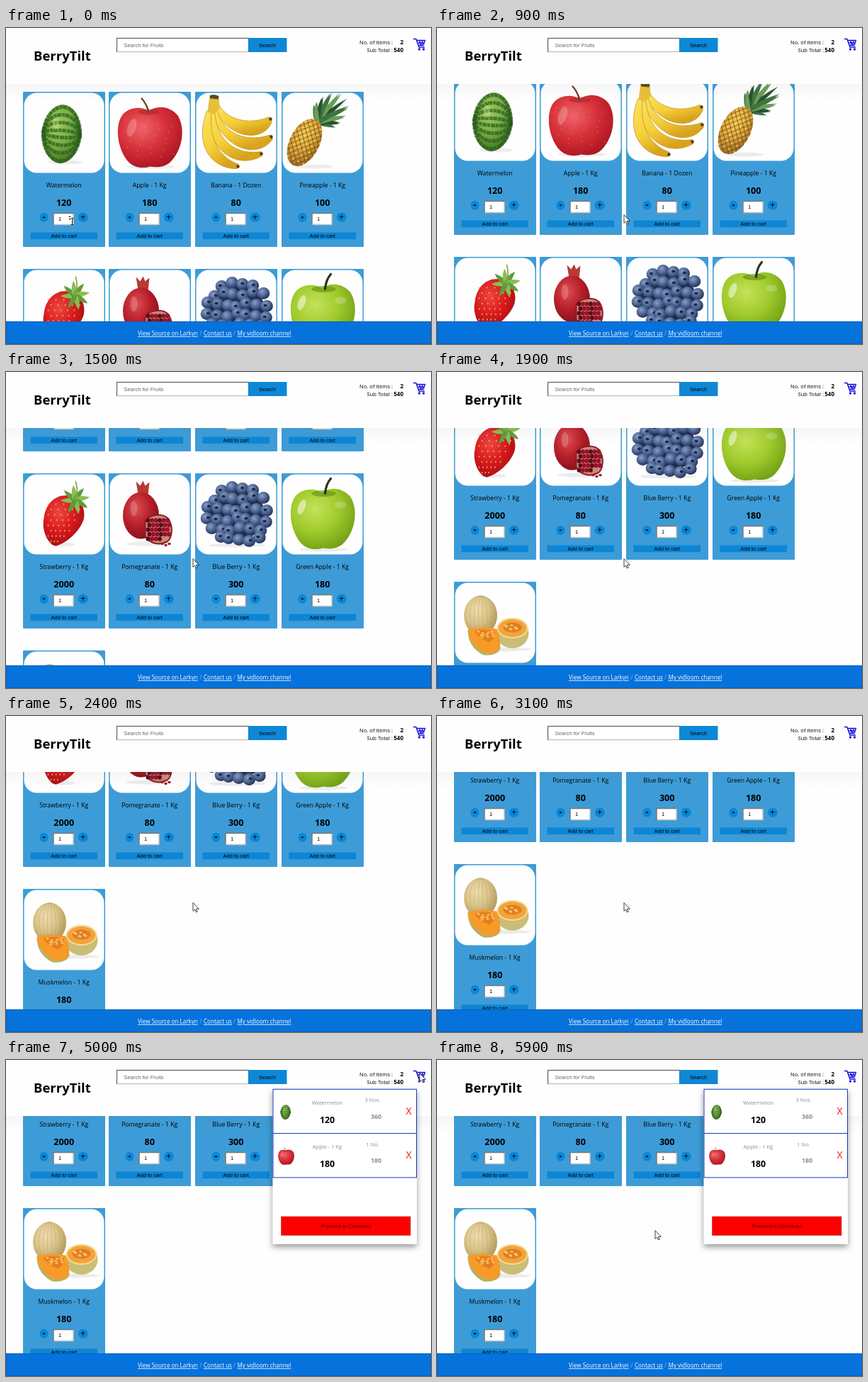
These frames come from a looping animation (600x446 px, 6000 ms). An HTML page:

```html
<!DOCTYPE html>
<html lang="en">
<head>
<meta charset="utf-8">
<title>BerryTilt</title>
<style>
html, body { margin: 0; width: 100%; height: 100%; overflow: hidden; background: #fefefe; }
svg { display: block; width: 600px; height: 446px; }
text { font-family: "Open Sans", "Noto Sans", sans-serif; white-space: pre; }
.ui { font-family: "Liberation Sans", Arial, sans-serif; }
.b { font-weight: 700; }
.mid { text-anchor: middle; }
.end { text-anchor: end; }
.link { fill: #fff; text-decoration: underline; }
#menu { filter: drop-shadow(0 4px 4px rgba(0, 0, 0, .4)); }
</style>
</head>
<body>
<svg id="stage" viewBox="0 0 600 446"></svg>
<script>
const many = (n, make) => Array.from({ length: n }, (_, i) => make(i)).join('');
const text = (x, y, size, str, cls = '', fill = '#000') =>
  `<text x="${x}" y="${y}" font-size="${size}" class="${cls}" fill="${fill}">${str}</text>`;
const rect = (x, y, w, h, fill, more = '') =>
  `<rect x="${x}" y="${y}" width="${w}" height="${h}" fill="${fill}" ${more}/>`;
const oval = (x, y, rx, ry, fill, more = '') =>
  `<ellipse cx="${x}" cy="${y}" rx="${rx}" ry="${ry}" fill="${fill}" ${more}/>`;
const path = (d, fill, stroke = 'none', width = 1) =>
  `<path d="${d}" fill="${fill}" stroke="${stroke}" stroke-width="${width}" stroke-linecap="round" stroke-linejoin="round"/>`;
const group = (x, y, body, more = '') => `<g transform="translate(${x} ${y}) ${more}">${body}</g>`;
const glow = (id, ...colors) => `<radialGradient id="${id}" cx=".38" cy=".34" r=".75">` +
  colors.map((c, i) => `<stop offset="${i / (colors.length - 1)}" stop-color="${c}"/>`).join('') + '</radialGradient>';
const shade = (x, y, rx) => oval(x, y, rx, 3, '#ececec');

const defs = `<defs>
  ${glow('green', '#a4cc62', '#74ab40', '#356a20')}
  ${glow('red', '#ee6468', '#d62f38', '#a5121f')}
  ${glow('lime', '#c5e258', '#9fca2c', '#6b9a12')}
  ${glow('pink', '#ee4640', '#d81a1e', '#a00a10')}
  ${glow('wine', '#dc4e50', '#b81f2a', '#7c0f1a')}
  ${glow('blue', '#8b9fc4', '#4c6494', '#1a2546')}
  ${glow('tan', '#eedcae', '#d9c388', '#a98f52')}
  ${glow('gold', '#f8d058', '#dca436', '#936220')}
  <linearGradient id="yellow" x2=".5" y2="1"><stop stop-color="#fce364"/><stop offset=".6" stop-color="#f6d03a"/><stop offset="1" stop-color="#d8a31c"/></linearGradient>
  <linearGradient id="fade" x2="0" y2="1"><stop stop-color="#667" stop-opacity=".05"/><stop offset="1" stop-color="#667" stop-opacity="0"/></linearGradient>
  <pattern id="net" width="8" height="9" patternUnits="userSpaceOnUse">
    <path d="M0 0L8 9M8 0L0 9" stroke="#6e4a16" stroke-width="1"/><circle cx="4" cy="0.9" r="1" fill="#f7da80"/></pattern>
</defs>`;

// Each fruit is drawn in a 113 px square.
const watermelon = shade(58, 98, 24) + group(53, 58,
  oval(0, 0, 27, 41.5, 'url(#green)') +
  many(4, i => oval(0, 0, 26, 5 + i * 11, 'none',
    'stroke="#2a5c1c" stroke-width="5" stroke-dasharray="6 1 4 .6" opacity=".7"')) +
  oval(-9, -14, 5, 9, '#d2eaa6', 'opacity=".3"'), 'rotate(4)');

const appleBody = 'M55 26C65 17 85 18 96 32C107 50 103 78 88 95C80 105 67 106 57 104C47 107 36 106 28 99C13 85 6 52 16 34C24 20 45 18 55 26Z';
const apple = shade(58, 104, 34) + path(appleBody, 'url(#red)') +
  oval(55, 27, 15, 4, '#a92528', 'opacity=".55"') +
  path('M45 8Q51 14 55 27', 'none', '#6a4024', 2.4) +
  oval(31, 49, 6, 13, '#fff', 'opacity=".22" transform="rotate(18 31 49)"') +
  many(26, i => oval(22 + i * 29 % 69, 38 + i * 17 % 55, .6, 1.2, '#f2a08c', 'opacity=".45"'));

const banana = [
  'M31 14C38 34 70 48 103 34L107 40C98 68 52 70 25 24Z',
  'M29 20C34 56 70 72 105 59L108 65C90 92 42 86 20 26Z',
  'M26 24C28 70 58 88 92 83L93 89C64 106 20 92 15 28Z',
  'M22 24C16 66 34 92 60 101L58 107C24 108 -4 76 15 26Z'
].map(d => path(d, 'url(#yellow)', '#c08d1b', .7)).join('') +
  path('M19 4Q26 1 32 5L33 22L25 30L16 27Z', '#e6bf3a') + path('M19 4Q26 1 32 5L31 9L20 8Z', '#5a4a1c') +
  many(4, i => oval([105, 106, 92, 59][i], [37, 62, 86, 104][i], 2.2, 2.2, '#4c3b18'));

const leaf = i => {
  const angle = i * 53 % 120 - 14;
  const length = 24 + 30 * Math.cos((angle - 46) * Math.PI / 180) ** 4;
  return `<g transform="translate(49 42) rotate(${angle})">` +
    path(`M-3 2Q-5 ${-length / 2} 1 ${-length}Q4 ${-length / 2} 3 2Z`, ['#3f7340', '#6a9c58', '#28532f'][i % 3]) + '</g>';
};
const pineapple = shade(44, 104, 26) + many(17, leaf) +
  group(31, 70, oval(0, 0, 21, 36, 'url(#gold)') + oval(0, 0, 21, 36, 'url(#net)'), 'rotate(27)');

const strawberry = shade(54, 99, 18) +
  path('M28 62C30 42 44 28 62 30C80 32 88 50 84 64C78 82 58 98 45 101C34 100 24 78 28 62Z', 'url(#pink)') +
  many(38, i => {
    const row = i / 5 | 0, span = 11 - row * .9;
    return oval(34 + i % 5 * span + row % 2 * 4, 42 + row * 7.5, .8, 1.3, '#f3b25e');
  }) +
  many(8, i => `<g transform="translate(72 36) rotate(${i * 43 - 95})">` +
    path('M-2.5 2Q-6 -10 1 -21Q5 -10 2.5 2Z', i % 2 ? '#5f9c3a' : '#8cbc54') + '</g>') +
  path('M72 36Q77 24 73 10', 'none', '#86aa4c', 1.8);

const pomegranate = shade(55, 98, 32) +
  path('M40 28L37 10L43 16L47 9L50 16L56 11L54 30Z', '#b83a34') +
  oval(44, 58, 25.5, 33, 'url(#wine)') + oval(34, 48, 5, 11, '#fff', 'opacity=".2"') +
  path('M50 67C55 56 75 54 83 63C90 74 88 90 81 95C66 102 53 95 50 86Z', '#c98a78', '#8a1c26', 2) +
  many(28, i => oval(54 + i % 6 * 5.5 + (i / 6 | 0) % 2 * 2, 65 + (i / 6 | 0) * 6.5, 2.9, 3.2,
    i % 3 ? '#96122a' : '#5f0b18')) +
  many(3, i => oval(74 + i * 5, 98 + i % 2 * 2, 2.2, 1.8, '#a51428'));

const berryRows = [[36, 20, 4], [24, 34, 6], [15, 49, 7], [15, 64, 7], [20, 78, 6], [32, 91, 5]];
const blueberry = shade(58, 100, 40) + oval(57, 57, 40, 36, '#202c4c') +
  berryRows.map(([x, y, n]) => many(n, i =>
    group(x + i * 13.6 + (i * 37 + y) % 4, y + (i * 23 + y) % 7 - 3,
      oval(0, 0, 8.8, 8.4, 'url(#blue)') +
      ((i + y) % 3 ? oval((i + y) % 5 - 2, -1, 2.6, 2, '#1c2847') : '')))).join('');

const greenApple = shade(58, 106, 34) + path(appleBody, 'url(#lime)') +
  oval(58, 27, 17, 4.5, '#628c12', 'opacity=".6"') +
  path('M60 27Q61 14 68 6', 'none', '#2e3018', 3.2) +
  oval(27, 46, 5, 11, '#fff', 'opacity=".5" transform="rotate(20 27 46)"') +
  oval(82, 43, 8, 5, '#fff', 'opacity=".2"');

const muskmelon = shade(68, 94, 38) + oval(36, 46, 23.5, 28, 'url(#tan)') +
  many(4, i => oval(36, 46, 3 + i * 6, 27.5, 'none', 'stroke="#bda668" stroke-width=".7" stroke-dasharray="3 1"')) +
  oval(81, 71, 23, 21.5, '#c9bd78') + oval(81, 64, 22, 14.5, '#f2dc94') +
  oval(81, 64, 20, 12.5, '#f6a23a') + oval(81, 63, 13, 7, '#df7f22') +
  many(9, i => oval(71 + i * 7 % 20, 60 + i * 5 % 7, 2, 1.2, '#f8c870')) +
  path('M18 67Q18 91 40 102Q59 104 64 93Q64 78 59 66Q39 61 18 67Z', '#bdb062') +
  path('M18 66Q21 87 42 98Q57 101 63 93Q65 76 58 65Q38 61 18 66Z', '#f79a28') +
  path('M27 69Q42 63 56 69Q57 80 48 84Q36 80 27 69Z', '#e58020') +
  many(11, i => oval(33 + i * 7 % 22, 69 + i * 5 % 9, 2, 1.2, '#f9c463'));

const products = [
  ['Watermelon', 120, watermelon], ['Apple - 1 Kg', 180, apple],
  ['Banana - 1 Dozen', 80, banana], ['Pineapple - 1 Kg', 100, pineapple],
  ['Strawberry - 1 Kg', 2000, strawberry], ['Pomegranate - 1 Kg', 80, pomegranate],
  ['Blue Berry - 1 Kg', 300, blueberry], ['Green Apple - 1 Kg', 180, greenApple],
  ['Muskmelon - 1 Kg', 180, muskmelon]
];

const field = (x, y, w, h) => rect(x, y, w, h, '#fff') +
  path(`M${x} ${y + h}H${x + w}V${y}`, 'none', '#c4c4c4', 1.5) +
  path(`M${x} ${y + h}V${y}H${x + w}`, 'none', '#787878', 1.5);

const card = ([name, price, fruit], i) => group(24 + Math.floor(i % 4 * 121.7), 90 + (i / 4 | 0) * 250,
  rect(0, 0, 116, 219, '#3d9cd7', 'rx="1"') + rect(1.5, 1.5, 113, 113, '#fefefe', 'rx="18"') +
  group(1.5, 1.5, fruit) +
  text(57.7, 135, 8.7, name, 'mid') + text(57.7, 160.5, 12.6, price, 'mid b') +
  oval(29.5, 177.3, 6, 6.5, '#0c86d5') + oval(84.8, 177.3, 7, 6.8, '#0c86d5') +
  text(29.5, 181, 12, '-', 'mid b') + text(84.8, 181.4, 12, '+', 'mid') +
  field(43, 171.5, 28, 16) + text(50, 182, 7.6, '1', 'ui') +
  rect(10.5, 198.5, 94.5, 9.7, '#0c86d5') + text(57.7, 206.2, 7.5, 'Add to cart', 'ui mid'));

const cartIcon = path('M575.5 15.5H579L583 27H590.5M580 17.5H591.5L589 24.5H582.3M581 21H590M584 17.5L585.5 24.5M588 17.5L587 24.5', 'none', '#1d12d6', 1.5) +
  oval(583.5, 30, 1.7, 1.7, '#1d12d6') + oval(589.5, 30, 1.7, 1.7, '#1d12d6');

const header = rect(0, 79, 600, 24, 'url(#fade)') + rect(0, 0, 600, 79, '#fefefe') +
  text(39, 46, 18.5, 'BerryTilt', 'b') +
  field(156.5, 14.5, 186, 19) + text(166.5, 26.6, 7.6, 'Search for Fruits', 'ui', '#666') +
  rect(342, 14, 54.5, 20, '#0f87d6') + text(369, 26.7, 7.5, 'Search', 'ui mid') +
  text(546, 23.2, 7.6, 'No. of items :', 'end') + text(561, 23.2, 8, '2', 'b end') +
  text(546, 34.4, 7.6, 'Sub Total :', 'end') + text(561, 34.4, 8, '540', 'b end') + cartIcon;

const footer = rect(.5, 414.5, 599, 31, '#0672dc', 'stroke="#0a62bf"') +
  text(186, 434.3, 8.1, 'View Source on Larkyn', 'link') + text(275, 434.3, 8.1, '/', 'mid', '#8ab8e8') +
  text(279, 434.3, 8.1, 'Contact us', 'link') + text(322.5, 434.3, 8.1, '/', 'mid', '#8ab8e8') +
  text(326.5, 434.3, 8.1, 'My vidloom channel', 'link');

const line = (y, [name, price, fruit], count, total) => group(0, y,
  rect(377, 0, 202.5, 62.3, '#fff', 'stroke="#1c38c4" stroke-width="1"') +
  group(381.4, 17.8, fruit, 'scale(.25)') +
  text(453.5, 21.5, 7.5, name, 'mid', '#8c8c8c') + text(453.5, 47.4, 12.4, price, 'mid b') +
  text(517.5, 18, 7.5, count, 'mid', '#8c8c8c') + text(522.5, 41.6, 8.9, total, 'mid b', '#8c8c8c') +
  text(568.5, 35.8, 14, 'X', 'mid', '#f01818'));

const menu = rect(376.5, 41, 203.5, 219, '#fff') +
  line(41.3, products[0], '3 Nos.', 360) + line(103.6, products[1], '1 No.', 180) +
  rect(388.5, 221, 182.5, 26.5, '#fe0000', 'stroke="#a33" stroke-width=".6"') +
  text(480, 237, 7.6, 'Proceed to Checkout', 'ui mid', '#5c0808');

const find = id => document.getElementById(id);
find('stage').innerHTML = defs + rect(0, 0, 600, 446, '#fefefe') +
  `<g id="list">${products.map(card).join('')}</g>` + header + footer +
  `<g id="menu">${menu}</g>` +
  `<g id="caret">${path('M88.3 267L90 264.7L91.7 267ZM88.3 269L90 271.3L91.7 269Z', '#333')}${path('M92 268.5H95M93.5 268.5V277.5M92 277.5H95', 'none', '#111', .9)}</g>` +
  `<g id="arrow">${path('M0 0V11.4L2.6 9L4.4 13L6.1 12.2L4.4 8.3H8Z', '#fff', '#111', .8)}</g>`;

// Keys are [time, ...values].
const scrollKeys = [[800, 0], [1100, 50], [1200, 50], [1500, 197], [1900, 294], [2300, 346], [2400, 346], [2700, 381]];
const arrowKeys = [[100, 264, 264], [3300, 264, 264], [4100, 584, 19], [5200, 584, 19], [5800, 308, 241]];

function valueAt(keys, t, ease = k => k) {
  const next = keys.findIndex(key => key[0] > t);
  if (next < 0) return keys.at(-1).slice(1);
  if (next === 0) return keys[0].slice(1);
  const a = keys[next - 1], b = keys[next];
  const k = ease((t - a[0]) / (b[0] - a[0]));
  return a.slice(1).map((v, i) => v + (b[i + 1] - v) * k);
}

const smooth = k => k * k * (3 - 2 * k);
const show = (id, on) => find(id).setAttribute('visibility', on ? 'visible' : 'hidden');
const start = performance.now();

function draw() {
  const t = Math.floor((performance.now() - start) % 6000 / 100) * 100;
  const [scroll] = valueAt(scrollKeys, t);
  find('list').setAttribute('transform', `translate(0 ${-Math.round(scroll)})`);
  find('arrow').setAttribute('transform', `translate(${valueAt(arrowKeys, t, smooth).map(Math.round)})`);
  show('caret', t < 100);
  show('arrow', t >= 100);
  show('menu', t >= 4900);
  requestAnimationFrame(draw);
}
draw();
</script>
</body>
</html>
```
